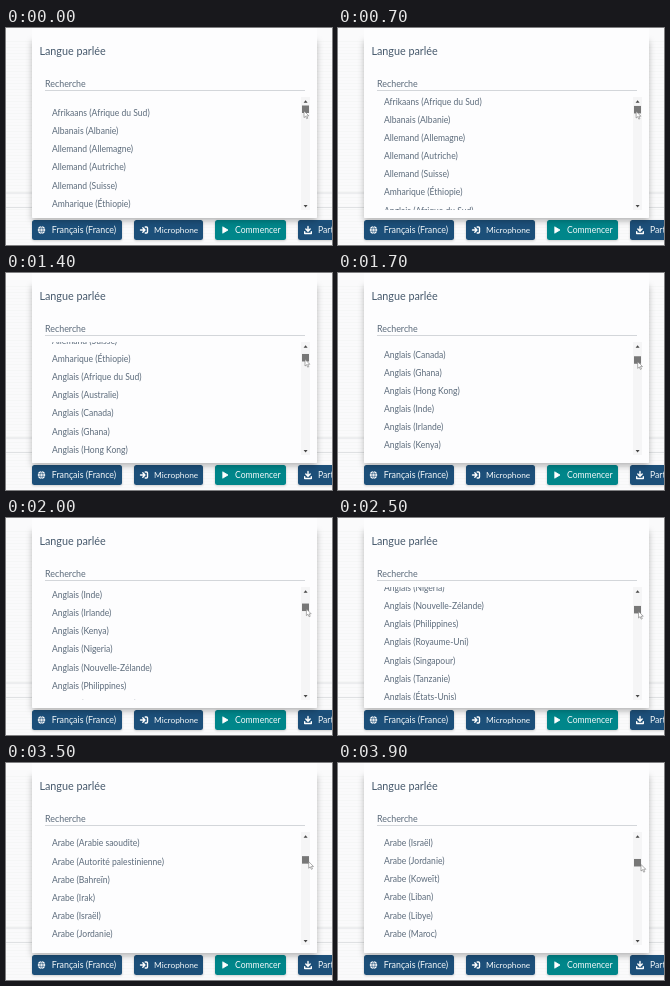
Recreate the animation shown at these times as an HTML page. Size 326x217 px, loop 4000 ms.

```html
<!DOCTYPE html>
<html lang="fr">
<head>
<meta charset="utf-8">
<title>Langue parlée</title>
<style>
html, body { margin: 0; width: 100%; height: 100%; overflow: hidden; background: #fafafb; }
svg { display: block; width: 326px; height: 217px; }
text { font-family: Lato, "Open Sans", sans-serif; font-variant-ligatures: none; }
.row { font-size: 8.55px; fill: #5c6b7b; }
.label { fill: #f4f8fa; }
.icon { fill: none; stroke: #fff; stroke-width: 1.4; stroke-linejoin: round; stroke-linecap: round; }
</style>
</head>
<body>
<svg viewBox="0 0 326 217" xmlns="http://www.w3.org/2000/svg">
  <defs>
    <filter id="shade" x="-10%" y="-10%" width="120%" height="125%">
      <feDropShadow dx="0" dy="3" stdDeviation="3" flood-color="#000" flood-opacity=".27"/>
    </filter>
    <filter id="lift" x="-10%" y="-20%" width="120%" height="150%">
      <feDropShadow dx="0" dy=".8" stdDeviation=".8" flood-color="#000" flood-opacity=".2"/>
    </filter>
    <clipPath id="view"><rect x="30" y="69" width="264" height="113"/></clipPath>
  </defs>
  <rect width="326" height="217" fill="#fafafb"/>
  <g id="grain"></g>
  <path d="M0 165H326M0 179.5H326" stroke="#dfe1e3"/>

  <g id="buttons"></g>
  <g class="icon">
    <circle cx="35.5" cy="202" r="3.7" fill="#fff" stroke="none"/>
    <path d="M32 200.7h7M32 203.3h7M35.5 198.5c-2 2-2 5 0 7c2-2 2-5 0-7" stroke="#1d4f79" stroke-width=".6"/>
    <path d="M134.5 202h4M136.8 199.8l2.2 2.2l-2.2 2.2M139.2 199h1.3q1 0 1 1v4q0 1-1 1h-1.3"/>
    <path d="M217 199l5 3l-5 3z" fill="#fff" stroke-width=".8"/>
    <path d="M302 198.5v4.5M299.8 201l2.2 2.2l2.2-2.2M298.7 203.8v1.7h6.6v-1.7"/>
  </g>

  <rect x="26" y="10" width="285" height="180" rx="1" fill="#fdfdfe" filter="url(#shade)"/>
  <rect x="26" y="0" width="285" height="12" fill="#fdfdfe"/>
  <text x="33.4" y="26.6" font-size="10.8" fill="#46596c">Langue parlée</text>
  <text x="39" y="58.7" font-size="8.9" fill="#5c6b7b">Recherche</text>
  <path d="M39 62.5H299" stroke="#d3d6da"/>
  <g clip-path="url(#view)"><g id="list"></g></g>

  <rect x="295" y="69" width="9" height="113" fill="#f5f5f6"/>
  <path d="M297.6 74.8h4l-2-2.5zM297.6 177h4l-2 2.5z" fill="#484848"/>
  <rect id="thumb" x="296" y="77.5" width="7" height="7.5" fill="#777"/>
  <path id="pointer" d="M0 0V6.6L1.6 5.2L2.7 7.7L3.8 7.2L2.7 4.8H4.8Z" fill="#fff" stroke="#777" stroke-width=".6"/>
</svg>
<script>
const $ = id => document.getElementById(id);
const PITCH = 18.14, STEP = 100, LOOP = 4000;
const BLUE = "#1d4f79", TEAL = "#00868a";

const langs = [
  ["Afrikaans", "Afrique du Sud"],
  ["Albanais", "Albanie"],
  ["Allemand", "Allemagne,Autriche,Suisse"],
  ["Amharique", "Éthiopie"],
  ["Anglais", "Afrique du Sud,Australie,Canada,Ghana,Hong Kong,Inde,Irlande,Kenya,Nigeria,Nouvelle-Zélande,Philippines,Royaume-Uni,Singapour,Tanzanie,États-Unis"],
  ["Arabe", "Algérie,Arabie saoudite,Autorité palestinienne,Bahreïn,Irak,Israël,Jordanie,Koweït,Liban,Libye,Maroc,Oman,Qatar"]
];

// step, scroll offset, pointer x
const path = [
  [6, 0, 298], [10, 44.8, 298.5], [14, 89.7, 299], [20, 207.5, 300.4],
  [25, 269, 300.5], [31, 330.6, 302.4], [39, 476.6, 303]
];

function add(parent, tag, attrs, text) {
  const el = document.createElementNS("http://www.w3.org/2000/svg", tag);
  for (const k in attrs) el.setAttribute(k, attrs[k]);
  if (text) el.textContent = text;
  parent.appendChild(el);
}

function button(x, w, color, tx, size, label) {
  add($("buttons"), "rect", { x, y: 192, width: w, height: 20, rx: 2.5, fill: color, filter: "url(#lift)" });
  add($("buttons"), "text", { x: tx, y: 205.2, "font-size": size, class: "label" }, label);
}

langs.flatMap(([name, places]) => places.split(",").map(p => `${name} (${p})`))
  .forEach((s, i) => add($("list"), "text", { x: 46, y: 88 + i * PITCH, class: "row" }, s));

for (let y = 13; y < 217; y += 3)
  add($("grain"), "path", { d: `M0 ${y + .5}H326`, stroke: y % 2 ? "#f5f6f6" : "#f8f8f9" });

button(26, 90, BLUE, 45.8, 8.85, "Français (France)");
button(128, 69, BLUE, 148, 8.3, "Microphone");
button(209, 71, TEAL, 229, 8.6, "Commencer");
button(292, 60, BLUE, 312, 8.6, "Partager");

function pose(step) {
  if (step <= path[0][0]) return path[0].slice(1);
  const i = path.findIndex(p => step <= p[0]);
  const a = path[i - 1], b = path[i], k = (step - a[0]) / (b[0] - a[0]);
  return [1, 2].map(n => a[n] + (b[n] - a[n]) * k);
}

function draw(t) {
  const [scroll, x] = pose(Math.floor(t % LOOP / STEP));
  const drag = scroll / 25.8;
  $("list").setAttribute("transform", `translate(0 ${-scroll})`);
  $("thumb").setAttribute("transform", `translate(0 ${drag})`);
  $("pointer").setAttribute("transform", `translate(${x} ${83 + drag})`);
}

const start = performance.now();
function tick() {
  draw(performance.now() - start);
  requestAnimationFrame(tick);
}
tick();
</script>
</body>
</html>
```
